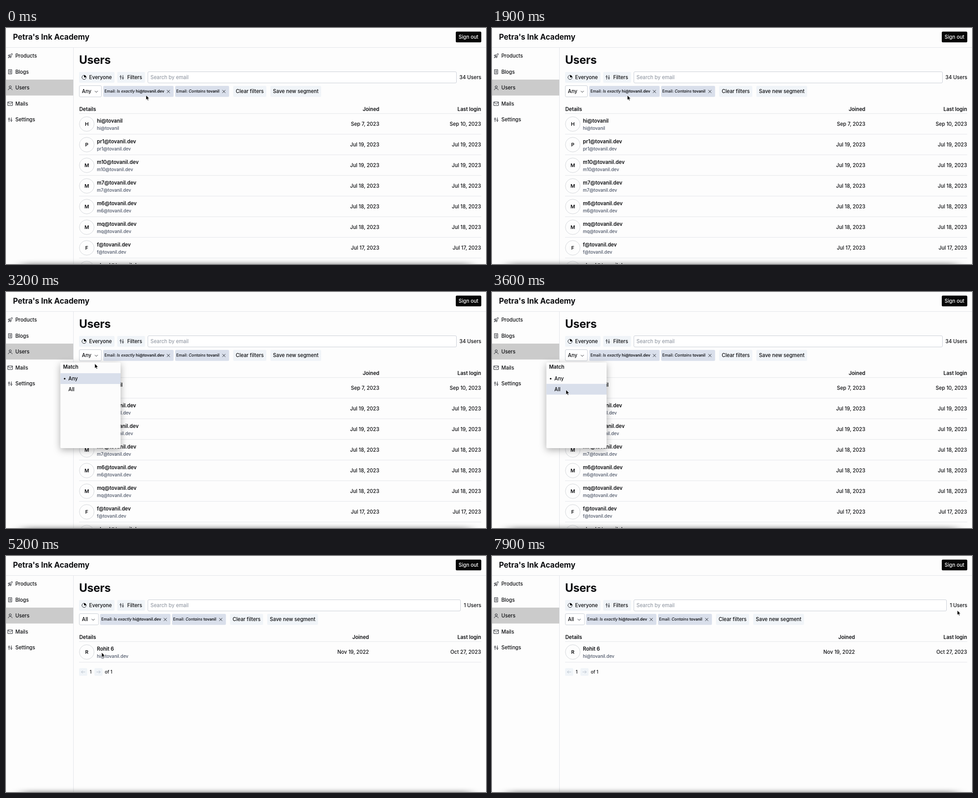
These frames come from a looping animation (1064x526 px, 8000 ms). An HTML page:

```html
<!DOCTYPE html>
<html lang="en">
<head>
<meta charset="utf-8">
<title>Users</title>
<style>
  html, body { margin: 0; width: 100%; height: 100%; overflow: hidden; background: #fdfdfd; }
  svg { display: block; width: 100%; height: 100%; font-family: Inter, "Liberation Sans", sans-serif; font-weight: 500; font-optical-sizing: none; }
  text { fill: #0b0c0f; white-space: pre; }
  .semi { font-weight: 600; }
  .bold { font-weight: 700; }
  .end { text-anchor: end; }
  .center { text-anchor: middle; }
  .sub { fill: #4b5466; }
  .hint { fill: #868d99; font-weight: 400; }
  .light { fill: #fff; }
  .soft { fill: #f0f4f8; }
  .chip { fill: #d9dfeb; }
  .box { fill: #fff; stroke: #c9ced6; }
  .rule { stroke: #e3e5e9; }
  .icon { fill: none; stroke: #1c1f26; stroke-linecap: round; stroke-linejoin: round; }
  .faint { stroke: #b8c0cc; }
  .avatar { fill: #fdfdfd; stroke: #d3d6da; }
  .menu { fill: #fcfcfc; filter: drop-shadow(0 4px 8px rgba(0, 0, 0, .32)); }
</style>
</head>
<body>
<svg id="stage" viewBox="0 0 1064 526"></svg>
<script>
const SIZE = 11.2;

// y is the middle of the capital letters
const text = (x, y, s, cls = '', size = SIZE) =>
  `<text x="${x}" y="${y + size * .36}" class="${cls}" font-size="${size}">${s}</text>`;
const rect = (x, y, w, h, cls, extra = '') =>
  `<rect x="${x}" y="${y}" width="${w}" height="${h}" rx="2.5" class="${cls}" ${extra}/>`;
const icon = (x, y, d, cls = '') =>
  `<path transform="translate(${x} ${y})" d="${d}" class="icon ${cls}"/>`;
const rule = y => `<path d="M162 ${y}H1053.5" class="rule"/>`;
const ring = (x, y, r) => `M${x - r} ${y}a${r} ${r} 0 1 0 ${2 * r} 0a${r} ${r} 0 1 0 ${-2 * r} 0`;

const sliders = 'M-2.5 -4.5V-3M-2.5 0V4.5M2.5 -4.5V0M2.5 3V4.5' + ring(-2.5, -1.5, 1.5) + ring(2.5, 1.5, 1.5);
const cross = 'M-3 -3L3 3M3 -3L-3 3';
const nav = [
  ['Products', 'M-1.5 1.5C-1 -2 1 -4.5 4.7 -4.7C4.5 -1 2 1 -1.5 1.5ZM-1 -2H-3.5L-4.5 0L-2 .5M2 1V3.5L0 4.5L-.5 2M-3 2.5L-4.5 4.5L-2 3.5'],
  ['Blogs', 'M-3.5 -4.8H3.5V4.8H-3.5ZM-1.5 -2.2H1.5M-1.5 0H1.5M-1.5 2.2H1.5'],
  ['Users', ring(0, -2, 2.4) + 'M-4.3 4.7C-4.3 .3 4.3 .3 4.3 4.7'],
  ['Mails', 'M-5 -4H5V4H-5ZM-5 -3L0 .8L5 -3'],
  ['Settings', sliders]
];

const table = (joinedX, rows) =>
  text(162.5, 181.3, 'Details', 'semi') + text(joinedX, 181.3, 'Joined', 'semi end') +
  text(1053, 181.3, 'Last login', 'semi end') + rule(190.7) +
  rows.map(([name, mail, joined, login], i) => {
    const y = 214 + 46 * i;
    return `<circle cx="179" cy="${y}" r="16.3" class="avatar"/>` +
      text(179, y + .3, name[0].toUpperCase(), 'semi center', 11) +
      text(201.5, y - 7, name, 'semi') + text(201.5, y + 9, mail, 'sub', 9.9) +
      text(joinedX, y, joined, 'end') + text(1053, y, login, 'end') + rule(y + 22.7);
  }).join('');

const domain = '@tovanil';
const anyRows = [['hi' + domain, 'hi' + domain, 'Sep 7, 2023', 'Sep 10, 2023']].concat(
  [['pr1', 19], ['m10', 19], ['m7', 18], ['m6', 18], ['mq', 18], ['f', 17], ['cloud', 17]].map(([user, day]) => {
    const mail = user + domain + '.dev', date = `Jul ${day}, 2023`;
    return [mail, mail, date, date];
  }));
const allRows = [['Rohit 6', 'hi' + domain + '.dev', 'Nov 19, 2022', 'Oct 27, 2023']];

const chipText = (test, value) =>
  `Email: <tspan font-style="italic">${test}</tspan> <tspan class="semi">${value}</tspan>`;

document.getElementById('stage').innerHTML = `
<defs><filter id="blur" x="-10%" y="-200%" width="120%" height="500%"><feGaussianBlur stdDeviation="14 5"/></filter></defs>
<rect width="1064" height="526" fill="#fdfdfd"/>
${text(15.5, 20, "Petra's Ink Academy", 'bold', 16.9)}
${rect(997, 8, 56.5, 24, '', 'fill="#050505"')}${text(1025.2, 20, 'Sign out', 'center light')}
<path d="M0 43.5H1064M149.5 43.5V526" class="rule"/>
<rect y="115" width="149" height="35.5" fill="#cbcbcb"/>
${nav.map(([name, d], i) => icon(9.3, 62 + 35.6 * i, d) + text(20.7, 62 + 35.6 * i, name)).join('')}
<g letter-spacing="-.3">${text(162, 71, 'Users', 'bold', 25)}</g>
${rect(162, 98, 78.5, 24, 'soft')}${icon(173, 110, ring(0, 0, 4.7))}
<path d="M173 110V105.3A4.7 4.7 0 0 1 177.7 110Z"/>${text(184.3, 110, 'Everyone')}
${rect(246.5, 98, 61.5, 24, 'soft')}${icon(256.7, 110, sliders)}${text(268.7, 110, 'Filters')}
${rect(314.5, 97.5, 684, 25, 'box', 'id="search"')}${text(320.3, 110, 'Search by email', 'hint')}
<g id="count">${text(1053.5, 110, '', 'end')}</g>
${rect(162.5, 128.5, 49, 25, 'box', 'id="select"')}
<g id="match">${text(168.3, 141, '')}</g>
<g id="chips">
  ${icon(200.2, 142, 'M-3 -1.5L0 1.5L3 -1.5')}
  ${rect(215.5, 129, 156, 24.5, 'chip')}${text(218.3, 141, chipText('Is exactly', 'hi' + domain + '.dev'), '', 8.75)}${icon(360, 141.5, cross)}
  ${rect(375, 129, 119.5, 24.5, 'chip')}${text(377.5, 141, chipText('Contains', domain.slice(1)), '', 8.75)}${icon(483, 141.5, cross)}
  ${rect(503.5, 129, 73.5, 24.5, 'soft')}${text(540.3, 141, 'Clear filters', 'center')}
  ${rect(586, 129, 112.5, 24.5, 'soft')}${text(642.3, 141, 'Save new segment', 'center')}
</g>
<g id="anyTable">${table(827.5, anyRows)}</g>
<g id="allTable">${table(804.5, allRows)}
  ${rect(162, 250, 18, 17, 'soft')}${icon(171, 258.5, 'M4 0H-4L-1 -3M-4 0L-1 3', 'faint')}
  ${text(187.5, 258.5, '1', 'center', 10)}
  ${rect(196, 250, 18, 17, 'soft')}${icon(205, 258.5, 'M-4 0H4L1 -3M4 0L1 3', 'faint')}
  ${text(219, 258.5, 'of 1', '', 10)}
</g>
<g id="menu">
  ${rect(120.5, 157, 133.5, 191, 'menu')}
  <rect id="active" x="120.5" width="133.5" height="24" class="chip"/>
  ${text(126.5, 167, 'Match', 'semi')}<circle cx="130" cy="193.3" r="1.7"/>
  ${text(138.3, 193.3, 'Any')}${text(138.3, 217, 'All')}
</g>
<rect x="36" y="524" width="994" height="30" fill-opacity=".36" filter="url(#blur)"/>
<path id="arrow" d="M0 0V10.6L2.4 8.4L4 12L5.8 11.2L4.2 7.7H7.5Z" stroke="#fff" stroke-width=".8"/>
<path id="hand" d="M-1.3 .8C-1.3 -.5 .9 -.5 .9 .8V4.5C3 3.8 4 4.5 4.3 5C6 4.5 7.3 5.5 7.3 7C7.3 9 6.5 10 6 12H.3C-.5 10 -3 8.5 -3.6 6.8C-3.7 5.6 -2.3 5.8 -1.3 7Z" fill="#fff" stroke="#000"/>`;

const $ = id => document.getElementById(id);
const show = (id, on) => $(id).style.display = on ? '' : 'none';

// pointer stops: time, x, y
const path = [
  [100, 310.3, 149.7], [400, 284, 146], [600, 275, 140], [800, 306, 144], [1000, 350, 149],
  [1100, 361.6, 150.3], [1300, 366, 152], [1900, 300, 150], [2300, 212, 147], [2700, 205, 145],
  [3100, 205, 145], [3600, 164, 218], [5100, 164, 218], [5200, 212, 215], [5700, 413, 256],
  [6000, 364, 246], [6100, 360, 245], [6300, 360, 245], [6700, 1059.5, 107], [6800, 1061, 104],
  [7200, 1039, 119], [7600, 1038, 121], [7800, 1038, 121], [7900, 1031.3, 121]
];

function pointer(t) {
  const i = path.findIndex(p => p[0] >= t);
  if (i < 1) return path[0].slice(1);
  const [t0, x0, y0] = path[i - 1], [t1, x1, y1] = path[i];
  const k = (t - t0) / (t1 - t0);
  return [x0 + (x1 - x0) * k, y0 + (y1 - y0) * k];
}

function render(now) {
  const t = Math.floor(now % 8000 / 100) * 100;
  const [x, y] = pointer(t);
  const open = t >= 2900 && t < 4500, all = t >= 4500, loaded = t >= 4600;
  const hover = t < 3200 && x < 212 && y < 154;

  $('match').firstChild.textContent = all ? 'All' : 'Any';
  $('select').setAttribute('width', all ? 42.5 : 49);
  $('select').style.stroke = hover && !open ? '#9ca1aa' : '';
  $('chips').setAttribute('transform', `translate(${all ? -7 : 0} 0)`);
  $('count').firstChild.textContent = loaded ? '1 Users' : '34 Users';
  $('search').setAttribute('width', loaded ? 693 : 684);
  show('anyTable', !loaded);
  show('allTable', loaded);
  show('menu', open);
  $('active').setAttribute('y', y < 205 ? 181 : 204.7);

  show('hand', hover);
  show('arrow', !hover);
  $(hover ? 'hand' : 'arrow').setAttribute('transform', `translate(${x} ${y})`);
}

const start = performance.now();
function tick() {
  render(performance.now() - start);
  requestAnimationFrame(tick);
}
tick();
</script>
</body>
</html>
```
